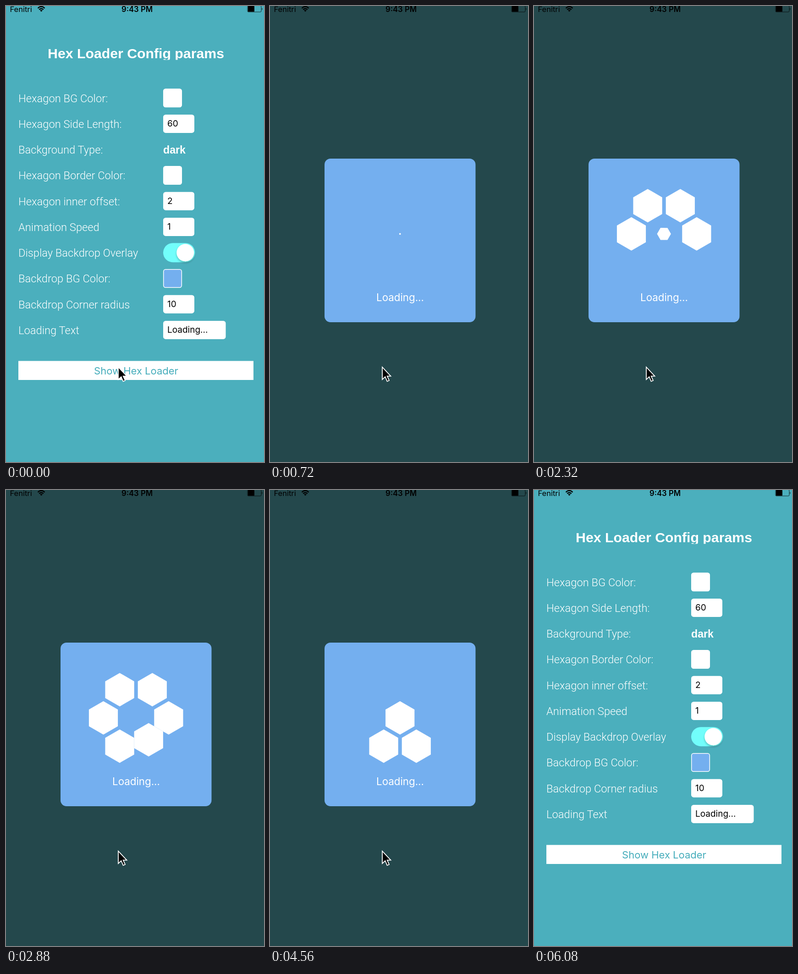
These frames come from a looping animation (563 px wide and 995 px high, 6160 ms). An HTML page:

```html
<!DOCTYPE html>
<html lang="en">
<head>
<meta charset="utf-8">
<title>Hex loader</title>
<style>
  html, body { margin: 0; width: 100%; height: 100%; overflow: hidden; background: #4bafbd; }
  svg { display: block; width: 563px; height: 995px; }
  text { font-family: Inter, Roboto, sans-serif; white-space: pre; }
  .label { font: 300 23.7px Roboto, "Open Sans", sans-serif; fill: #fff; }
  .bold { font-family: "Liberation Sans", Arial, sans-serif; font-weight: 700; fill: #fff; }
  .value { font-size: 19px; fill: #000; }
  .mid { text-anchor: middle; }
</style>
</head>
<body>
<svg viewBox="0 0 563 995">
  <defs>
    <clipPath id="titleClip"><rect x="0" y="80" width="563" height="37.5"/></clipPath>
    <filter id="soft" x="-30%" y="-30%" width="160%" height="170%">
      <feDropShadow dx="0" dy="3" stdDeviation="2" flood-color="#000" flood-opacity=".25"/>
    </filter>
  </defs>
  <rect width="563" height="995" fill="#4bafbd"/>

  <g id="form">
    <g clip-path="url(#titleClip)">
      <text class="bold mid" x="283.5" y="114" font-size="30.25">Hex Loader Config params</text>
    </g>
    <g id="rows"></g>
    <rect x="27" y="774.5" width="513" height="41.5" fill="#fff"/>
    <text class="mid" x="284" y="804" font-size="22" fill="#45adbb">Show Hex Loader</text>
  </g>

  <g id="loader">
    <rect width="563" height="995" fill="#24484c"/>
    <rect x="119" y="333" width="329.5" height="357" rx="13" fill="#74afef"/>
    <g id="hexes" fill="#fff"></g>
    <text class="mid" x="284" y="644" font-size="22.3" fill="#fff">Loading...</text>
  </g>

  <g id="status">
    <text x="8.5" y="13" font-size="16.5">Fenitri</text>
    <g fill="none" stroke="#000" stroke-width="2.4">
      <path d="M69.5 4.8Q77 -2.2 84.5 4.8"/>
      <path d="M72.3 7.8Q77 3.6 81.7 7.8"/>
    </g>
    <path d="M74.2 9.7Q77 7.4 79.8 9.7L77 12.6Z"/>
    <text class="mid" x="286" y="13" font-size="16.7" font-weight="600">9:43 PM</text>
    <rect x="527" y="-.5" width="30" height="13.5" rx="2" fill="none" stroke="#000" stroke-opacity=".75"/>
    <rect x="528" y="0" width="14" height="12.5" rx="1"/>
    <path d="M558.5 4q2 2.5 0 5Z"/>
  </g>

  <path id="cursor" d="M245 788v27l6.4-6 4.2 10 4.4-2-4.3-9.4h7.8Z" fill="#000" stroke="#fff" stroke-width="1.8"/>
</svg>

<script>
const LOOP = 6160, STEP = 80;
const OPEN = 720, CLOSE = 5600, CURSOR_OFF = 5840;

// Loader timing in ms
const SPIN = 160, MOVE = 120;
const IN_START = 697, IN_GAP = 388;
const OUT_START = 3177, OUT_GAP = 371;

const CENTER = { x: 283.7, y: 497.3 };
const RADIUS = 36.5, DX = 71.2, DY = 61.6;
const SLOTS = [
  [-DX / 2, -DY], [DX / 2, -DY], [-DX, 0], [DX, 0],
  [-DX / 2, DY], [DX / 2, DY], [0, 0]
];

const byId = id => document.getElementById(id);

function add(parent, tag, attrs, text = "") {
  const el = document.createElementNS("http://www.w3.org/2000/svg", tag);
  for (const key in attrs) el.setAttribute(key, attrs[key]);
  el.textContent = text;
  parent.append(el);
  return el;
}

const ROWS = [
  ["Hexagon BG Color:", "swatch", "#fff"],
  ["Hexagon Side Length:", "field", "60"],
  ["Background Type:", "word", "dark"],
  ["Hexagon Border Color:", "swatch", "#fff"],
  ["Hexagon inner offset:", "field", "2"],
  ["Animation Speed", "field", "1"],
  ["Display Backdrop Overlay", "toggle"],
  ["Backdrop BG Color:", "swatch", "#74afef"],
  ["Backdrop Corner radius", "field", "10"],
  ["Loading Text", "field", "Loading...", 136.5]
];

const controls = {
  swatch(g, y, color) {
    add(g, "rect", { x: 343.7, y: y - 19.8, width: 39.6, height: 39.6, rx: 4.5,
      fill: color, stroke: "#fff", "stroke-width": 1.5 });
  },
  field(g, y, value, width = 68) {
    add(g, "rect", { x: 343, y: y - 20, width, height: 40, rx: 5.5, fill: "#fff" });
    add(g, "text", { class: "value", x: 352, y: y + 6.5 }, value);
  },
  word(g, y, value) {
    add(g, "text", { class: "bold", x: 343, y: y + 8.8, "font-size": 23.2 }, value);
  },
  toggle(g, y) {
    add(g, "rect", { x: 343, y: y - 21, width: 69.5, height: 42, rx: 21, fill: "#72fefb" });
    add(g, "circle", { cx: 391.3, cy: y, r: 19, fill: "#fff", filter: "url(#soft)" });
  }
};

ROWS.forEach(([label, kind, value, width], i) => {
  const y = 200.7 + i * 56.25;
  add(byId("rows"), "text", { class: "label", x: 27, y: y + 8.8 }, label);
  controls[kind](byId("rows"), y, value, width);
});

const corners = Array.from({ length: 6 }, (_, i) => {
  const a = (i * 60 - 90) * Math.PI / 180;
  return [RADIUS * Math.cos(a), RADIUS * Math.sin(a)].map(v => v.toFixed(2)).join();
}).join(" ");
const hexes = SLOTS.map(() => add(byId("hexes"), "polygon", { points: corners }));

function ease(t) {
  const p = Math.min(1, Math.max(0, t));
  return p * p * (3 - 2 * p);
}

// Each hexagon spins up in the middle, slides out, later slides back and spins away.
function poseHex(el, i, t) {
  const [dx, dy] = SLOTS[i];
  const born = IN_START + i * IN_GAP;
  const leave = OUT_START + i * OUT_GAP;
  const back = dx || dy ? MOVE : 0;
  const size = ease((t - born) / SPIN) - ease((t - leave - back) / SPIN);
  const out = ease((t - born - SPIN) / MOVE) - ease((t - leave) / MOVE);
  const x = CENTER.x + dx * out, y = CENTER.y + dy * out;
  el.setAttribute("transform", `translate(${x} ${y}) rotate(${-360 * size}) scale(${size})`);
  show(el, size > 0);
}

function show(el, on) {
  el.style.display = on ? "" : "none";
}

function draw(t) {
  const open = t >= OPEN && t < CLOSE;
  show(byId("form"), !open);
  show(byId("loader"), open);
  show(byId("cursor"), t < CURSOR_OFF);
  hexes.forEach((el, i) => poseHex(el, i, t));
}

const start = performance.now();
function tick() {
  const t = (performance.now() - start) % LOOP;
  draw(Math.floor(t / STEP) * STEP);
  requestAnimationFrame(tick);
}
tick();
</script>
</body>
</html>
```
